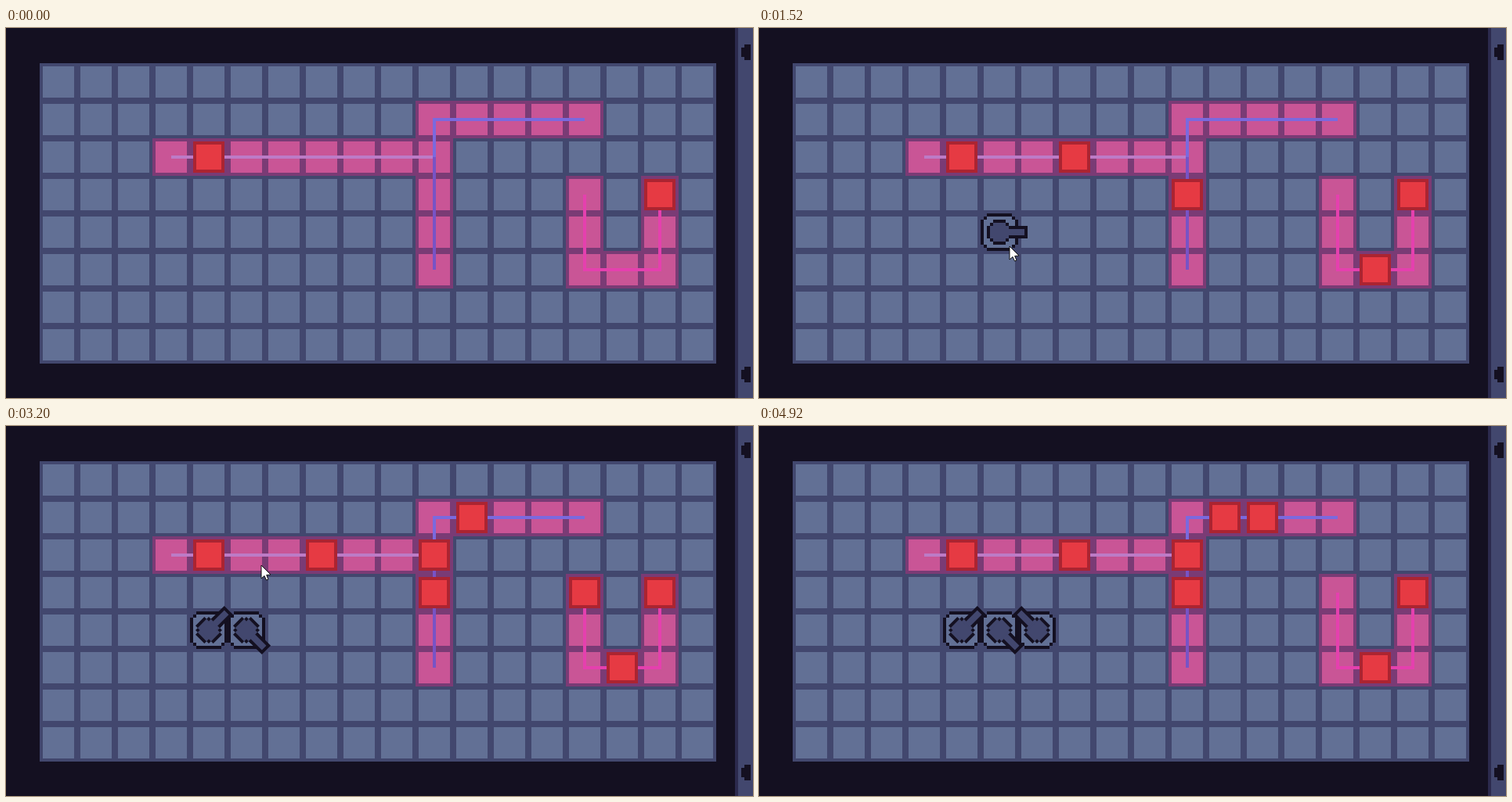
These frames come from a looping animation (954x473 px, 5040 ms). An HTML page with a canvas:

```html
<!DOCTYPE html>
<html lang="en">
<head>
<meta charset="utf-8">
<title>Tower defence</title>
<style>
html, body { margin: 0; width: 100%; height: 100%; overflow: hidden; background: #141021; }
canvas { display: block; }
</style>
</head>
<body>
<canvas id="stage" width="954" height="473"></canvas>
<script>
const ctx = document.getElementById('stage').getContext('2d');
const LOOP = 5040, STEP = 40, CELL = 48;
const FIRST_TICK = 282, TICK = 560, MOVE = 130;
const DARK = '#141021', SLATE = '#42476e', TILE = '#627095';

// Routes are corner points in grid cells; a walker enters every third tick.
const routes = [
  { first: -1, points: [[3, 2], [10, 2], [10, 1], [14, 1]] },
  { first: 1, points: [[10, 5], [10, 1], [14, 1]] },
  { first: 0, points: [[16, 3], [16, 5], [14, 5], [14, 3]] }
];
const traces = [
  ['#bd7bc6', [[3, 2], [10, 2]]],
  ['#7853c5', [[10, 5], [10, 2]]],
  ['#7b69de', [[10, 2], [10, 1], [14, 1]]],
  ['#e540ae', [[16, 3], [16, 5], [14, 5], [14, 3]]]
];

const ICON = [895, 29];
const turrets = [
  { cell: [5, 4], grab: 900, drop: 1320, fix: 2000 },
  { cell: [4, 4], grab: 2515, drop: 2840, fix: 3240 },
  { cell: [6, 4], grab: 3600, drop: 3880, fix: 4440 }
];
// Pointer path: time, x, y
const pointer = [
  [140, 800, 473], [480, 938, 90], [680, 884, 40], [900, 881, 36], [1120, 548, 120],
  [1320, 293, 268], [1440, 300, 270], [1760, 380, 306], [2000, 399, 325], [2060, 399, 325],
  [2270, 938, 80], [2440, 896, 32], [2520, 893, 30], [2840, 257, 262], [2920, 262, 258],
  [3200, 326, 178], [3280, 328, 176], [3420, 938, 60], [3520, 893, 33], [3600, 891, 32],
  [3800, 474, 237], [3880, 351, 264], [4000, 346, 258], [4360, 296, 202], [4560, 294, 200],
  [4900, 850, 473]
];
const presses = [[900, 1320], [1960, 2050], [2530, 2840], [3240, 3310], [3600, 3880], [4400, 4480]];
const drawerOpen = [[480, 900], [2270, 2525], [3400, 3600]];
const SLIDE = 140;

const clamp = v => Math.max(0, Math.min(1, v));
const center = ([col, row]) => [67 + CELL * col, 69 + CELL * row];
const within = (spans, t) => spans.some(([a, b]) => t >= a && t < b);

function box(color, x, y, w, h = w) {
  ctx.fillStyle = color;
  ctx.fillRect(x, y, w, h);
}

function pointerAt(t) {
  const i = pointer.findIndex(p => p[0] > t);
  if (i < 1) return pointer[i ? pointer.length - 1 : 0].slice(1);
  const [t0, x0, y0] = pointer[i - 1], [t1, x1, y1] = pointer[i];
  const k = (t - t0) / (t1 - t0);
  return [Math.round(x0 + (x1 - x0) * k), Math.round(y0 + (y1 - y0) * k)];
}

// Grid position after walking d cells, or null past the end.
function walk(points, d) {
  for (let i = 1; i < points.length; i++) {
    const [x0, y0] = points[i - 1], [x1, y1] = points[i];
    const len = Math.abs(x1 - x0) + Math.abs(y1 - y0);
    if (d < len) return [x0 + (x1 - x0) * d / len, y0 + (y1 - y0) * d / len];
    d -= len;
  }
  return null;
}

function drawBoard() {
  box(DARK, 0, 0, 954, 473);
  box(SLATE, 43, 45, 864, 384);
  for (let col = 0; col < 18; col++)
    for (let row = 0; row < 8; row++) box(TILE, 47 + CELL * col, 49 + CELL * row, 40);
  const cells = [];
  for (const { points } of routes) {
    for (let d = 0, c; (c = walk(points, d)); d++) cells.push(c);
    cells.push(points[points.length - 1]);
  }
  const spots = cells.map(center);
  for (const [x, y] of spots) box('#7a3b75', x - 24, y - 24, 48);
  for (const [x, y] of spots) box('#c95596', x - 20, y - 20, 40);
  ctx.lineWidth = 4;
  for (const [color, points] of traces) {
    ctx.strokeStyle = color;
    ctx.beginPath();
    points.forEach(p => ctx.lineTo(...center(p)));
    ctx.stroke();
  }
}

function drawWalkers(t) {
  const tick = Math.floor((t - FIRST_TICK) / TICK) + 1;
  const phase = t - FIRST_TICK - (tick - 1) * TICK;
  const eased = 1 - (1 - clamp(phase / MOVE)) ** 3;
  for (const { first, points } of routes)
    for (let born = first; born <= tick; born += 3) {
      const spot = walk(points, Math.max(0, tick - born - 1 + eased));
      if (!spot) continue;
      const [x, y] = center(spot).map(Math.round);
      box('#ab2431', x - 20, y - 20, 40);
      box('#e63a43', x - 16, y - 16, 32);
    }
}

// Stepped ring: four bars joined by corner pixels.
function ring(r, half) {
  for (const s of [-r, r - 4]) {
    box(DARK, -half, s, 2 * half, 4);
    box(DARK, s, -half, 4, 2 * half);
  }
  for (const x of [-r + 4, r - 8])
    for (const y of [-r + 4, r - 8]) box(DARK, x, y, 4);
}

function drawTurret(x, y, angle) {
  ctx.save();
  ctx.translate(x, y);
  box(TILE, -20, -20, 40);
  ring(24, 16);
  ctx.rotate(angle);
  box(SLATE, -12, -8, 24, 16);
  box(SLATE, -8, -12, 16, 24);
  ring(16, 8);
  box(DARK, 12, -8, 24, 16);
  box(SLATE, 10, -4, 22, 8);
  ctx.restore();
}

function drawTurrets(t) {
  for (const { cell, grab, drop, fix } of turrets) {
    if (t < grab) continue;
    const [px, py] = pointerAt(Math.min(t, fix));
    if (t < drop) {
      const [gx, gy] = pointerAt(grab);
      drawTurret(px - gx + ICON[0], py - gy + ICON[1], 0);
      continue;
    }
    const [x, y] = center(cell), dx = px - x, dy = py - y;
    const snap = Math.PI / 4;
    drawTurret(x, y, Math.hypot(dx, dy) < 24 ? 0 : Math.round(Math.atan2(dy, dx) / snap) * snap);
  }
}

function drawDrawer(t) {
  let open = 0;
  for (const [a, b] of drawerOpen)
    open = Math.max(open, Math.min(clamp((t - a) / SLIDE), 1 - clamp((t - b) / SLIDE)));
  ctx.save();
  ctx.translate(Math.round(88 * (1 - open)), 0);
  box('#2c2a4d', 843, 0, 4, 473);
  box(SLATE, 847, 0, 107, 473);
  for (const y of [21, 433]) {
    box(DARK, 855, y, 8, 20);
    box(DARK, 851, y + 4, 4, 12);
  }
  const left = turrets.filter(u => t < u.grab).length;
  if (left) drawTurret(...ICON, 0);
  ctx.fillStyle = '#fff';
  ctx.font = 'bold 25px "DejaVu Sans Mono", monospace';
  ctx.textAlign = 'center';
  ctx.fillText(left, 940, 24);
  ctx.restore();
}

function drawPointer(t) {
  if (t < 140 || t >= 4900) return;
  const [x, y] = pointerAt(t), pressed = within(presses, t);
  if (pressed) {
    ctx.fillStyle = 'rgba(200,192,20,0.72)';
    ctx.beginPath();
    ctx.arc(x, y, 12, 0, 2 * Math.PI);
    ctx.fill();
  }
  ctx.save();
  ctx.translate(x, y);
  ctx.beginPath();
  for (const p of [[0, 0], [0, 17], [4, 13.5], [6.5, 19], [9, 18], [6.7, 12.5], [12, 12]]) ctx.lineTo(...p);
  ctx.closePath();
  ctx.fillStyle = pressed ? '#ffffb4' : '#fff';
  ctx.strokeStyle = '#111';
  ctx.lineWidth = 1;
  ctx.fill();
  ctx.stroke();
  ctx.restore();
}

function render() {
  const t = Math.floor(performance.now() % LOOP / STEP) * STEP;
  drawBoard();
  drawWalkers(t);
  const dragging = turrets.some(u => t >= u.grab && t < u.drop);
  const layers = dragging ? [drawDrawer, drawTurrets] : [drawTurrets, drawDrawer];
  layers.forEach(draw => draw(t));
  drawPointer(t);
  requestAnimationFrame(render);
}
render();
</script>
</body>
</html>
```
